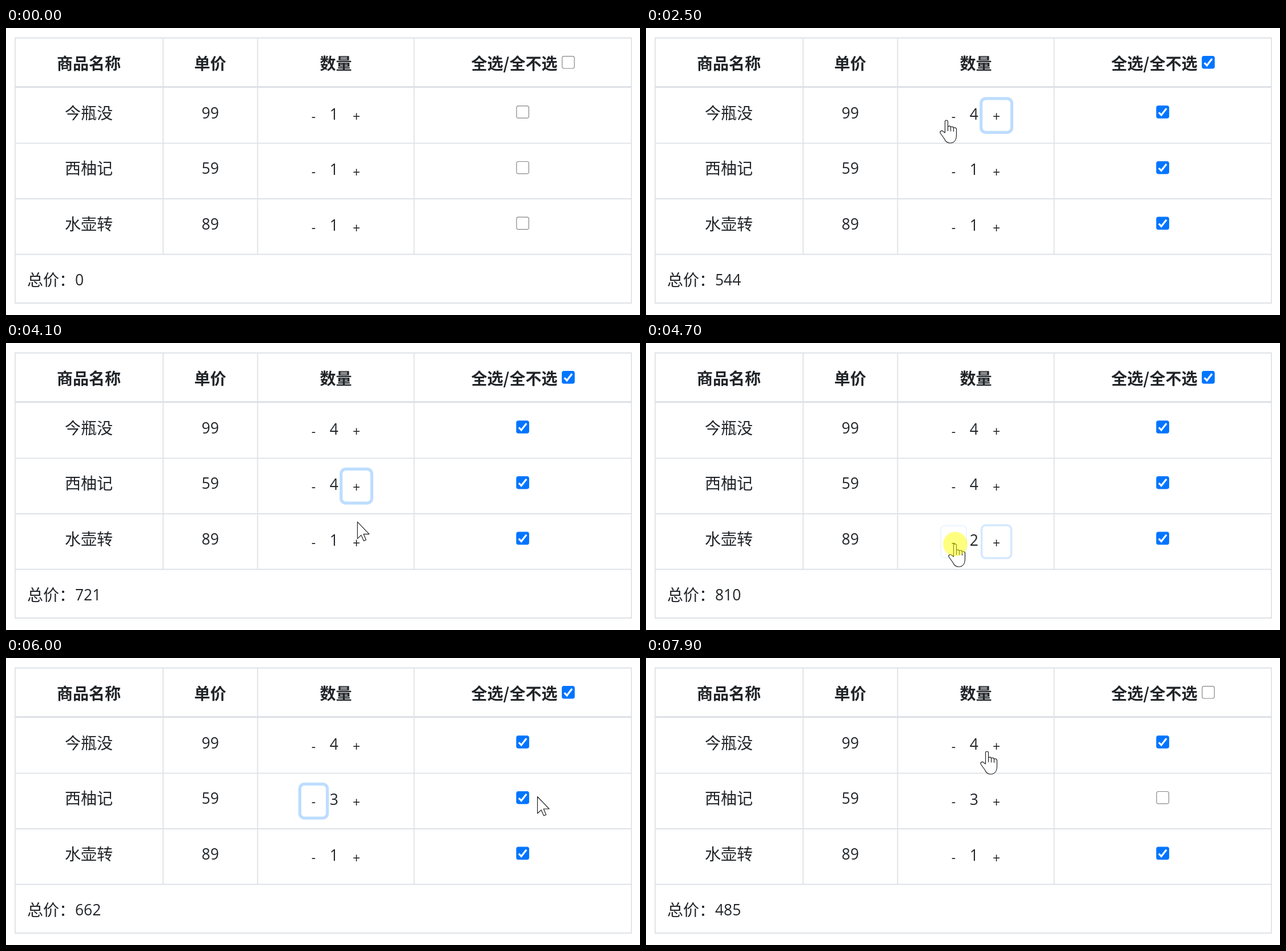
Recreate the animation shown at these times as an HTML page. Size 1110 px wide and 504 px high, loop 8000 ms.

```html
<!DOCTYPE html>
<html lang="zh-CN">
<head>
<meta charset="utf-8">
<title>购物车</title>
<style>
  html, body { margin: 0; width: 100%; height: 100%; overflow: hidden; background: #fff; }
  svg { display: block; width: 1110px; height: 504px; }
  text { font: 28px "Noto Sans CJK SC", "Noto Sans CJK", sans-serif; fill: #212529; text-anchor: middle; }
  .head { font-weight: 700; }
  .num { font: 26.4px "Open Sans", "Noto Sans", sans-serif; }
  .sign { font: 23px "Open Sans", "Noto Sans", sans-serif; }
  .left { text-anchor: start; }
  .grid { fill: none; stroke: #dee2e6; stroke-width: 1.8; }
  .ring { fill: none; stroke: #007bff; }
  .box { fill: #fff; stroke: #858585; stroke-width: 1.2; }
  .tick { fill: none; stroke: #fff; stroke-width: 3.2; visibility: hidden; }
  .on .box { fill: #0075ff; stroke: #0075ff; }
  .on .tick { visibility: visible; }
  .cursor { fill: #fff; stroke: #1c1c1c; stroke-width: 1.15; stroke-linejoin: round; }
</style>
</head>
<body>
<svg viewBox="0 0 1110 504">
  <path class="grid" d="M16 17.5H1095V483H16ZM275 17.5V397.5M440.5 17.5V397.5M714.5 17.5V397.5M16 202.3H1095M16 300H1095M16 397.5H1095"/>
  <path class="grid" style="stroke-width:3.4" d="M15 103.6H1096"/>
  <text class="head" x="145" y="72.5">商品名称</text>
  <text class="head" x="357.5" y="72.5">单价</text>
  <text class="head" x="577.5" y="72.5">数量</text>
  <text class="head" x="890" y="72.5">全选/全不选</text>
  <g id="rows"></g>
  <text class="left" x="37" y="452.5">总价：</text>
  <text class="num left" id="total" x="121" y="452">0</text>
  <g id="rings"></g>
  <g id="pointer">
    <g class="cursor">
      <path id="arrow" d="M.5.5V30L7 23.8 11.6 34 15.6 32.2 11.2 22H21Z"/>
      <g id="hand">
        <path d="M-2.5 22V2.5a2.5 2.5 0 0 1 5 0V12C3 9.4 7.5 9.4 7.5 12.5 8 10.5 12.5 11 12.5 14 13 12 17.5 12.5 17.5 16V26C17.5 34 14 40 6.5 40 0 40-2 36-4 32L-10.5 23C-12.5 19.5-8.5 17-6 19.5Z"/>
        <path d="M2.5 12V19M7.5 12.5V19.5M12.5 14V20"/>
      </g>
    </g>
    <circle id="spot" cx=".5" r="21.3" fill="#ff0" opacity=".5"/>
  </g>
</svg>
<script>
const LOOP = 8000, STEP = 100, PITCH = 97.7;
const FADE = 150, SPREAD = 5.25;
const goods = [["今瓶没", 99], ["西柚记", 59], ["水壶转", 89]];
const buttons = { minus: { x: 517, w: 43, add: -1 }, plus: { x: 589.3, w: 48.5, add: 1 } };
const BTN_TOP = 126.4, BTN_H = 54.3;

// Pointer stops; a stop with a press clicks its control `clicks` times.
const entry = { arrive: 300, x: 1082, y: 150 };
const stops = [
  { leave: 300, arrive: 800, x: 984, y: 61, press: 900, on: "all" },
  { leave: 1100, arrive: 1700, x: 604, y: 160, press: 1900, clicks: 3, on: "plus", row: 0 },
  { leave: 2400, arrive: 2500, x: 526, y: 162 },
  { leave: 2600, arrive: 3300, x: 620, y: 247, press: 3400, clicks: 3, on: "plus", row: 1 },
  { leave: 4000, arrive: 4200, x: 612, y: 350, press: 4200, on: "plus", row: 2 },
  { leave: 4500, arrive: 4700, x: 541, y: 353, press: 4700, on: "minus", row: 2 },
  { leave: 4800, arrive: 5100, x: 541, y: 262, press: 5400, on: "minus", row: 1 },
  { leave: 5500, arrive: 6000, x: 930, y: 243 },
  { leave: 6000, arrive: 6200, x: 908, y: 252, press: 6200, on: "check", row: 1 },
  { leave: 7100, arrive: 7600, x: 554, y: 247 },
  { leave: 7600, arrive: 7900, x: 597, y: 164 }
];
const presses = stops.filter(s => s.press);
const HOLD = 100, REPEAT = 200;   // press to release, press to press

const $ = id => document.getElementById(id);
const clamp = v => Math.max(0, Math.min(1, v));
const ease = k => 1 - (1 - k) ** 1.5;
const show = (el, on) => el.style.display = on ? "" : "none";

const checkbox = (x, y) => `<g class="check" transform="translate(${x} ${y})">
  <rect class="box" x="-10.7" y="-10.7" width="21.4" height="21.4" rx="3.2"/>
  <path class="tick" d="M-6.8.8L-2.4 5.4 6.6-6.2"/></g>`;

$("rows").innerHTML = checkbox(984.4, 60.3) + goods.map(([name, price], i) => {
  const y = i * PITCH;
  return `<text x="145" y="${159.7 + y}">${name}</text>
    <text class="num" x="357.7" y="${158.6 + y}">${price}</text>
    <text class="sign" x="538.5" y="${163.6 + y}">-</text>
    <text class="num qty" x="574.4" y="${160.5 + y}">1</text>
    <text class="sign" x="613.5" y="${164.2 + y}">+</text>` + checkbox(904.6, 147.5 + y);
}).join("");
$("rings").innerHTML = '<rect class="ring"/>'.repeat(presses.length);

const checks = document.querySelectorAll(".check");
const qtyTexts = document.querySelectorAll(".qty");
const rings = document.querySelectorAll(".ring");

function pointerAt(t) {
  let { x, y } = entry;
  for (const s of stops) {
    const k = ease(clamp((t - s.leave) / (s.arrive - s.leave)));
    x += (s.x - x) * k;
    y += (s.y - y) * k;
  }
  return [x, y];
}

function overButton(x, y) {
  const dy = (y - BTN_TOP) % PITCH;
  return y > BTN_TOP && dy < BTN_H &&
    Object.values(buttons).some(b => x > b.x && x < b.x + b.w);
}

function cartAt(t) {
  const qty = [1, 1, 1], checked = [false, false, false];
  let pressed = false;
  for (const { press, clicks = 1, on, row } of presses) {
    for (let n = 0; n < clicks; n++) {
      const since = t - press - n * REPEAT;
      if (since >= 0 && since < 2 * HOLD) pressed = true;
      if (since < HOLD) continue;
      if (on === "all") checked.fill(true);
      else if (on === "check") checked[row] = !checked[row];
      else qty[row] += buttons[on].add;
    }
  }
  return { qty, checked, pressed };
}

// Focus starts just before a press and leaves with the next one.
function drawRing(rect, i, t) {
  const { on, row, press } = presses[i], button = buttons[on];
  if (!button) return;
  const fade = at => clamp((t - at + STEP / 2) / FADE);
  const p = fade(press) - fade(presses[i + 1].press), s = SPREAD * p;
  const attrs = {
    x: button.x - s / 2, y: BTN_TOP + row * PITCH - s / 2,
    width: button.w + s, height: BTN_H + s, rx: 5.5 + s / 2,
    "stroke-width": s, opacity: .26 * p
  };
  for (const key in attrs) rect.setAttribute(key, attrs[key]);
}

function draw(t) {
  const { qty, checked, pressed } = cartAt(t);
  [checked.every(Boolean), ...checked].forEach((on, i) => checks[i].classList.toggle("on", on));
  qty.forEach((n, i) => qtyTexts[i].textContent = n);
  $("total").textContent = goods.reduce((sum, [, price], i) => sum + checked[i] * price * qty[i], 0);
  rings.forEach((rect, i) => drawRing(rect, i, t));

  const [x, y] = pointerAt(t), hand = overButton(x, y);
  $("pointer").setAttribute("transform", `translate(${x} ${y})`);
  show($("pointer"), t >= entry.arrive);
  show($("arrow"), !hand);
  show($("hand"), hand);
  show($("spot"), pressed);
}

const begin = performance.now();
function tick() {
  const t = (performance.now() - begin) % LOOP;
  draw(Math.floor(t / STEP) * STEP);
  requestAnimationFrame(tick);
}
tick();
</script>
</body>
</html>
```
